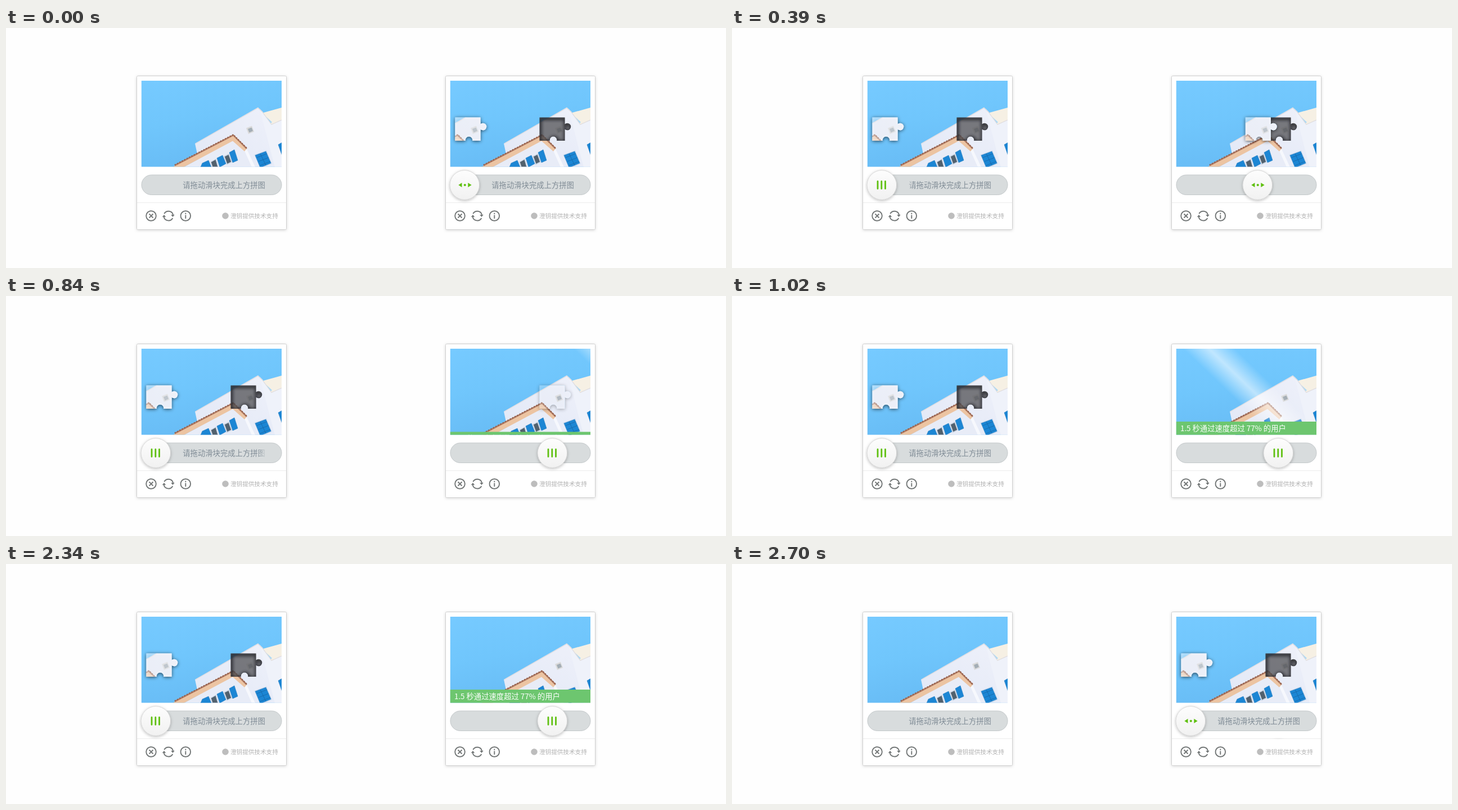
Write an HTML page that moves like this. It is 1280 by 428 pixels and loops after 2.88 s.

```html
<!DOCTYPE html>
<html lang="zh-CN">
<head>
<meta charset="utf-8">
<title>拼图滑块</title>
<style>
  html, body { margin: 0; width: 100%; height: 100%; overflow: hidden; background: #fefefe; }
  svg { display: block; width: 100%; height: 100%; }
  text { font-family: "Noto Sans CJK SC", "Noto Sans CJK", "Noto Sans CJK JP", sans-serif; }
</style>
</head>
<body>
<svg id="stage" viewBox="0 0 1280 428" xmlns="http://www.w3.org/2000/svg"></svg>
<script>
const LOOP = 2880, STEP = 30;
const CARD_GAP = 549, PIECE_TRAVEL = 150, KNOB_TRAVEL = 156;
const TONE = '#7f8b95', GREEN = '#5fc011';

const poly = (points, fill, extra = '') => `<polygon points="${points}" fill="${fill}" ${extra}/>`;
const line = (d, stroke, width, extra = '') =>
  `<path d="${d}" fill="none" stroke="${stroke}" stroke-width="${width}" ${extra}/>`;
const at = (x, body) => `<g transform="translate(${x} 0)">${body}</g>`;

const jigsaw = 'M399.5 159.5H444.5V171.5A6.3 6.3 0 1 1 444.5 180.5V201H430.2A6.3 6.3 0 1 0 417.8 201H399.5Z';

const shutter = points => poly(points, '#1c86d4', 'stroke="#2a7fc0" stroke-width=".6"');
const pane = points => poly(points, '#52616e', 'stroke="#c8d3e2" stroke-width="1.4"');

const photo = `<g id="photo" clip-path="url(#frame)">
  <rect x="240" y="93" width="251" height="156" fill="url(#sky)"/>
  ${poly('454,152 490,142 490,166 468,176', '#f6f0e4')}
  ${poly('458,154 473,168 468,172', '#a9d8f6')}
  ${poly('336,206 448,141.500 456,149 472,173 490,164 490,248 345,248', 'url(#wall)')}
  ${poly('451,144 456,150 472,173 490,164 490,248 478,248', '#eff2fa')}
  ${line('M337 206L448 142.500L456 150L472 172L490 164', '#dfdcdf', 1.2)}
  ${poly('427,178.500 437,174.500 441,185 431,189', '#dadada')}
  ${poly('430,180 436.500,177.500 439,183.500 432.500,186.500', '#a3adb5')}
  ${poly('404,200 424,219 437,248 316,248', '#e8ecf7')}
  ${poly('424,219 428,216 443,248 437,248', '#f6f8fd')}
  ${poly('296,248 318,235.500 404,190.500 428,215 424,220 403,201.500 316,248', '#ecc4a2')}
  ${line('M300 245L404 191L428 215', '#b07a62', 2.6)}
  ${line('M300 244L404 190L428 214', '#845546', 2, 'stroke-dasharray="1.6 3.2"')}
  ${shutter('346,248 349,241 360,236 365,248')}
  ${pane('364,239 373,234 377,248 367,248')}
  ${shutter('375,232 385,227 391,242 380,248')}
  ${pane('388,229 396,225 401,239 393,243')}
  ${shutter('397,222 406,217 412,236 403,240')}
  ${poly('441,226 463,218 473,242 454,251', '#d5e0f1')}
  ${shutter('443,227 462,220 471,241 452,249')}
  ${line('M452 224L462 245M446 231L464 224M449 238L467 231M452 245L470 238', '#1768a8', .8)}
  ${shutter('484,208 491,204 491,228')}
</g>`;

const defs = `<defs>
  <clipPath id="frame"><rect x="240.800" y="94" width="249.200" height="153.500"/></clipPath>
  <clipPath id="cut"><path d="${jigsaw}"/></clipPath>
  <linearGradient id="sky" x1="0" y1="0" x2=".3" y2="1">
    <stop stop-color="#76caff"/><stop offset=".5" stop-color="#70c6fc"/><stop offset="1" stop-color="#68bcf5"/>
  </linearGradient>
  <linearGradient id="wall" x1="0" y1="1" x2="1" y2="0">
    <stop stop-color="#e2e8f6"/><stop offset="1" stop-color="#eff1fa"/>
  </linearGradient>
  <linearGradient id="button" x1="0" y1="0" x2="0" y2="1">
    <stop stop-color="#fdfdfd"/><stop offset="1" stop-color="#f1f1f1"/>
  </linearGradient>
  <linearGradient id="beamFill">
    <stop stop-color="#fff" stop-opacity="0"/><stop offset=".5" stop-color="#fff" stop-opacity=".55"/>
    <stop offset="1" stop-color="#fff" stop-opacity="0"/>
  </linearGradient>
  <linearGradient id="shimmer" gradientUnits="userSpaceOnUse" x1="-16" x2="16" y1="0" y2="0">
    <stop stop-color="${TONE}"/><stop offset=".5" stop-color="#d6dadb"/><stop offset="1" stop-color="${TONE}"/>
  </linearGradient>
  <filter id="cardShade" x="-10%" y="-10%" width="120%" height="120%">
    <feDropShadow dx="0" dy="1" stdDeviation="2.500" flood-color="#000" flood-opacity=".15"/>
  </filter>
  <filter id="shade" x="-30%" y="-30%" width="160%" height="160%">
    <feDropShadow dx="0" dy="1.500" stdDeviation="2.500" flood-color="#000" flood-opacity=".26"/>
  </filter>
  <filter id="deep" x="-30%" y="-30%" width="160%" height="160%">
    <feDropShadow dx="0" dy="1" stdDeviation="3" flood-color="#000" flood-opacity=".65"/>
  </filter>
  <filter id="soft" x="-30%" y="-30%" width="160%" height="160%"><feGaussianBlur stdDeviation="2.500"/></filter>
  ${photo}
  <g id="hole">
    <path d="${jigsaw}" fill="#505155" opacity=".75"/>
    <g clip-path="url(#cut)">${line(jigsaw, '#17181a', 6, 'filter="url(#soft)" opacity=".7" transform="translate(1 2)"')}</g>
  </g>
  <g id="piece">
    <path d="${jigsaw}" fill="#dfe6ee" filter="url(#deep)"/>
    <g clip-path="url(#cut)">
      <use href="#photo"/>
      <path d="${jigsaw}" fill="#eceff3" opacity=".38"/>
      ${line(jigsaw, '#fff', 3, 'opacity=".45" filter="url(#soft)"')}
    </g>
  </g>
  <rect id="track" x="241" y="262" width="249" height="35.500" rx="17.750" fill="#d8dcdd" stroke="#c3c8ca"/>
  <g id="knob">
    <circle cx="266.300" cy="280" r="26.300" fill="url(#button)" stroke="#cfcfcf" stroke-width=".8" filter="url(#shade)"/>
  </g>
  <g id="bars">${line('M259 273.500V286.500M265.800 273.500V286.500M272.500 273.500V286.500', GREEN, 2.8, 'stroke-linecap="round"')}</g>
  <g id="arrows" fill="${GREEN}">
    <path d="M255.300 280L261.500 276V284ZM278.700 280L272.300 276V284Z"/><circle cx="266.800" cy="280" r="2.100"/>
  </g>
</defs>`;

const hint = (fill, id = '') =>
  `<text ${id && `id="${id}"`} x="314.300" y="284.900" font-size="13.333" fill="${fill}">请拖动滑块完成上方拼图</text>`;

const shell = `
  <rect x="232.500" y="85.500" width="266" height="274" rx="2" fill="#fff" stroke="#d0d0d0" filter="url(#cardShade)"/>
  ${line('M233 311.500H498', '#ececec', 1)}
  <g fill="none" stroke="#737777" stroke-width="1.900">
    <circle cx="258" cy="335" r="8.800"/><path d="M254.500 331.500L261.500 338.500M261.500 331.500L254.500 338.500"/>
    <path d="M281.300 331.200A8.500 8.500 0 0 1 297 333M280.600 337A8.500 8.500 0 0 0 296.300 339"/>
    <circle cx="319.300" cy="335" r="8.800"/><path d="M319.300 333.500V340M319.300 329.800V332"/>
  </g>
  <path d="M277.800 337L281 333L284.200 337ZM293.300 333H299.700L296.500 337Z" fill="#737777"/>
  <circle cx="390" cy="335" r="5.800" fill="#bdbdbd"/>
  <text x="399" y="339" font-size="10.600" fill="#b2b2b2">澄钥提供技术支持</text>`;

const picture = '<use href="#photo"/>', track = '<use href="#track"/>';

const leftCard = `${shell}${picture}${track}${hint('url(#shimmer)')}
  <g id="puzzle"><use href="#hole"/><use href="#piece" x="${-PIECE_TRAVEL}"/><use href="#knob"/><use href="#bars"/></g>`;

const rightCard = `${shell}${picture}
  <g id="match"><use href="#hole"/><use id="mover" href="#piece"/></g>
  <g clip-path="url(#frame)">
    <g id="beam"><rect x="-46" width="92" height="154" fill="url(#beamFill)" transform="skewX(46)"/></g>
    <g id="banner">
      <rect x="240" y="224" width="251" height="24" fill="#6dc66f"/>
      <text x="248" y="240.800" font-size="13.333" font-weight="500" fill="#fff">1.5 秒通过速度超过 77% 的用户</text>
    </g>
  </g>
  ${track}${hint(TONE, 'prompt')}
  <g id="slider"><use href="#knob"/><use id="dragging" href="#arrows"/><use id="settled" href="#bars"/></g>
  <g id="fresh">
    <rect x="233" y="87" width="264" height="223" fill="#fff"/>
    ${picture}<use href="#hole"/><use href="#piece" x="${-PIECE_TRAVEL}"/>
    ${track}${hint(TONE)}<use href="#knob"/><use href="#arrows"/>
  </g>`;

document.getElementById('stage').innerHTML = defs + at(0, leftCard) + at(CARD_GAP, rightCard);

const set = (id, name, value) => document.getElementById(id).setAttribute(name, value);
const shift = (id, x, y = 0) => set(id, 'transform', `translate(${x} ${y})`);
const ramp = (t, from, to) => Math.min(1, Math.max(0, (t - from) / (to - from)));
const easeInOut = p => p < .5 ? 2 * p * p : 1 - 2 * (1 - p) ** 2;

function draw(t) {
  const drag = easeInOut(ramp(t, 0, 595));
  const reset = ramp(t, 2340, 2700);

  set('puzzle', 'opacity', ramp(t, 0, 330) * (1 - reset));
  set('shimmer', 'gradientTransform', `translate(${307 + (t - 390) * .349} 0)`);

  shift('mover', PIECE_TRAVEL * (drag - 1));
  shift('slider', KNOB_TRAVEL * drag);
  set('prompt', 'opacity', 1 - ramp(t, 0, 210));
  set('dragging', 'opacity', t < 600 ? 1 : 0);
  set('settled', 'opacity', t < 600 ? 0 : 1);

  set('match', 'opacity', 1 - ramp(t, 700, 980));
  shift('banner', 0, 24 * (1 - ramp(t, 790, 1000)));
  shift('beam', 299 - (t - 1020) * 1.15, 94);
  set('beam', 'opacity', t > 750 && t < 1230 ? 1 : 0);
  set('fresh', 'opacity', reset);
}

const start = performance.now();
function tick() {
  const t = (performance.now() - start) % LOOP;
  draw(Math.floor(t / STEP) * STEP);
  requestAnimationFrame(tick);
}
tick();
</script>
</body>
</html>
```
